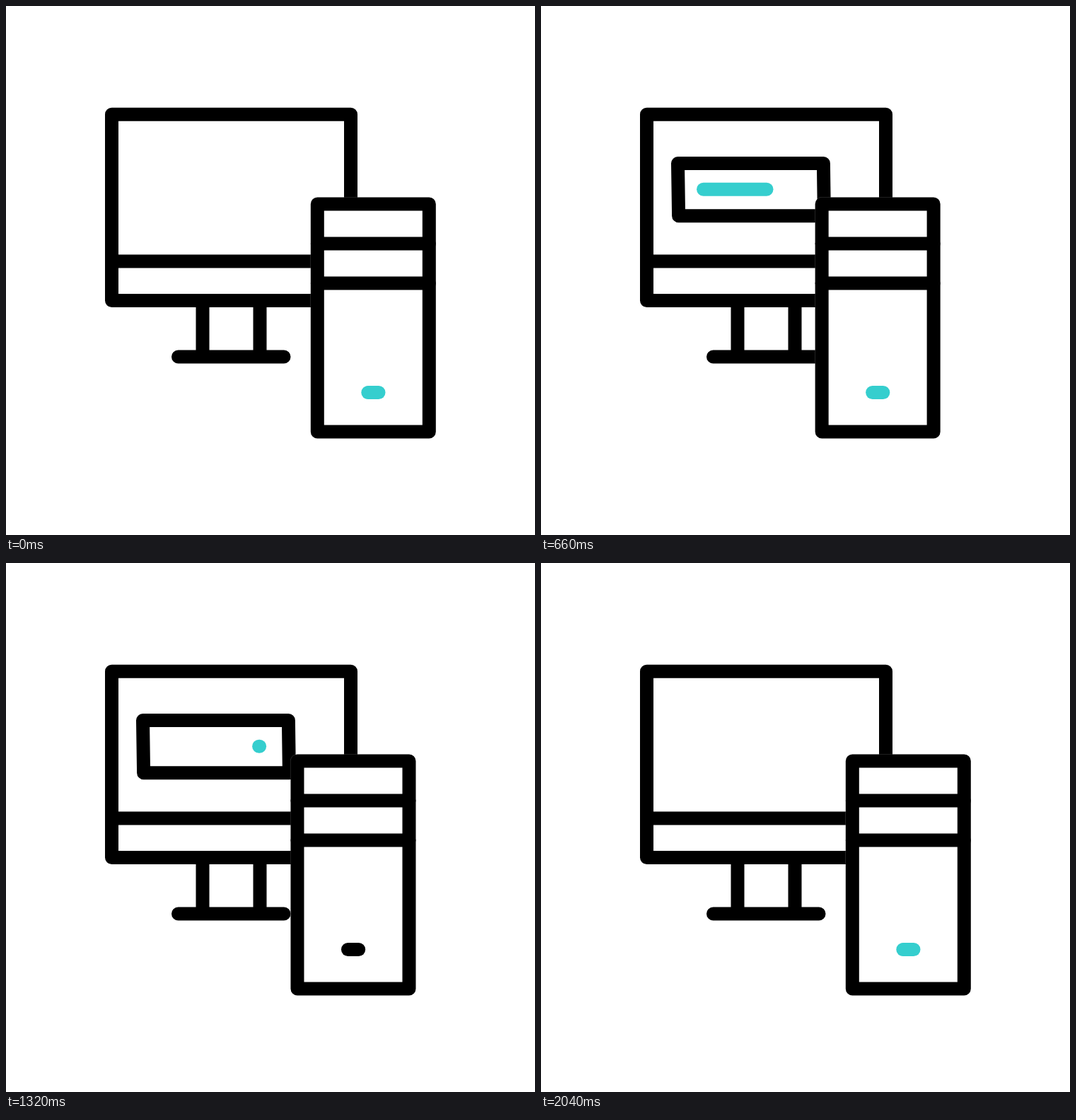
Recreate the animation shown at these times as an HTML page. Size 748x748 px, loop 2.25 s.

```html
<!DOCTYPE html>
<html lang="en">
<head>
<meta charset="utf-8">
<title>Desktop computer</title>
<style>
  html, body { margin: 0; height: 100%; overflow: hidden; background: #fff; }
  svg { display: block; width: 100vw; height: 100vh; }
  path { fill: none; stroke: #000; stroke-width: 19; stroke-linecap: round; stroke-linejoin: round; }
  #tower .body { fill: #fff; }
  #tower .seam { stroke: #fff; stroke-width: 20; opacity: .25; }
  #bar, #led.on { stroke: #35cece; }
</style>
</head>
<body>
<svg viewBox="0 0 748 748">
  <path d="M149.5 153.3H487.5V416.5H149.5ZM149.5 361H487.5M278 416.5V496M359 416.5V496M243.5 496H393"/>
  <path id="frame" pathLength="1" d="M400.4 296.8H194.6L193.5 222.6H399.4L400.4 296.8"/>
  <path id="bar" pathLength="1" d="M229.6 259.2H358.6"/>
  <g id="tower">
    <path class="seam" d="M440.3 280H598.3V602H440.3Z"/>
    <path class="body" d="M440.3 280H598.3V602H440.3Z"/>
    <path d="M440.3 336H598.3M440.3 392H598.3"/>
    <path id="led" d="M511.8 546.5H527"/>
  </g>
</svg>
<script>
  const STEP = 30, LOOP = 2250;
  const get = id => document.getElementById(id);
  const frame = get('frame'), bar = get('bar'), tower = get('tower'), led = get('led');

  const smooth = x => {
    const s = Math.min(1, Math.max(0, x));
    return s * s * (3 - 2 * s);
  };
  const ease = (n, from, to) => smooth((n - from) / (to - from));

  // Shows only the part of a path between two fractions of its length.
  function trim(path, start, end) {
    path.style.display = end > start ? '' : 'none';
    path.style.strokeDasharray = `${end - start} 9`;
    path.style.strokeDashoffset = -start;
  }

  function draw(now) {
    const n = Math.floor(now % LOOP / STEP);
    trim(frame, ease(n, 46.9, 66.4), ease(n, 1.5, 23.4));
    trim(bar, ease(n, 25.3, 45), ease(n, 10, 29));

    // The tower slides in and back, lingering at the turning point.
    const away = Math.abs(n - 31.5) / 19.5;
    tower.setAttribute('transform', `translate(${-59 * smooth(1 - away ** 1.5)} 0)`);

    led.classList.toggle('on', n >= 68 || (n + 1) % 23 < 6);
  }

  const begin = performance.now();
  function tick() {
    draw(performance.now() - begin);
    requestAnimationFrame(tick);
  }
  tick();
</script>
</body>
</html>
```
